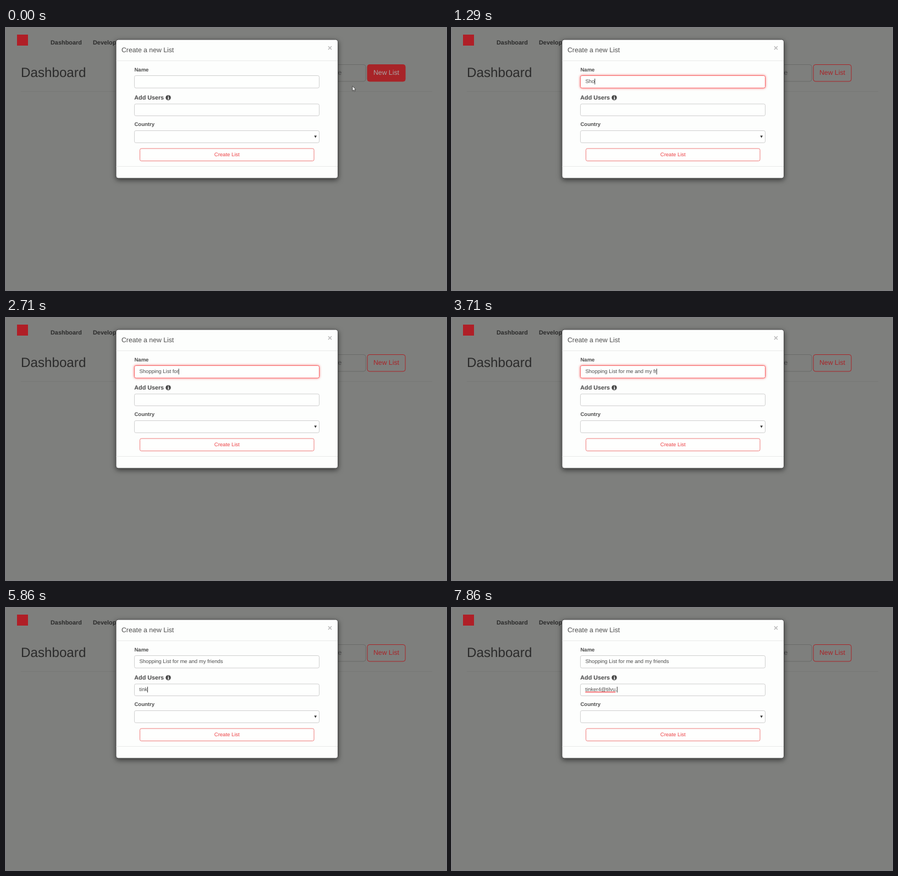
Write an HTML page that moves like this. It is 800 by 476 pixels and loops after 8000 ms.

```html
<!DOCTYPE html>
<html lang="en">
<head>
<meta charset="utf-8">
<title>Create a new List</title>
<style>
  html, body { margin: 0; width: 100%; height: 100%; overflow: hidden; background: #7e7f7d; }
  svg { display: block; font: 9.5px "Liberation Sans", Arial, sans-serif; text-rendering: geometricPrecision; }
  text { fill: #4d4d4d; white-space: pre; }
  .bold { font-weight: bold; }
  .large { font-size: 12.24px; }
  .dim { fill: #2b2b2b; }
  .rule { stroke: #e9eae9; }
  .box { fill: #fefffe; stroke: #cfcfcf; }
  .modal { fill: #fdfefd; stroke: #4a4a4a; filter: drop-shadow(0 3px 5px rgba(0, 0, 0, .55)); }
  .caret { stroke: #333; }
</style>
</head>
<body>
<svg width="800" height="476" viewBox="0 0 800 476">
  <rect x="20" y="12" width="20" height="20" fill="#b01f27"/>
  <g class="bold" font-size="10.9">
    <text class="dim" x="81" y="29.7">Dashboard</text>
    <text class="dim" x="158" y="29.7">Developers</text>
  </g>
  <text class="dim" x="27" y="89" font-size="24.2">Dashboard</text>
  <path d="M27 115.5H775" stroke="#767775"/>
  <rect x="420.5" y="66.5" width="233.5" height="30.5" rx="4" fill="none" stroke="#696a69"/>
  <text class="large" x="603.5" y="85.3">e</text>
  <rect id="newBox" x="657" y="66.5" width="69" height="30.5" rx="4" stroke="#a82428"/>
  <text id="newText" class="large" x="668" y="85.2">New List</text>

  <rect class="modal" x="200" y="21" width="403.5" height="252" rx="4"/>
  <text class="large" x="210" y="43.6">Create a new List</text>
  <text class="bold" x="584.8" y="41" font-size="14.3" style="fill:#bcbcbc">×</text>
  <path class="rule" d="M200.5 59.5H603M200.5 251.5H603"/>

  <text class="bold" x="233.5" y="78.6">Name</text>
  <rect id="nameBox" class="box" x="233.5" y="86.5" width="336" height="22.5" rx="2.7"/>
  <g id="link">
    <text id="linkText" class="bold" x="233.3" y="130.2" font-size="10.75">Add Users</text>
    <circle id="info" cx="295" cy="126.6" r="4.7"/>
    <path d="M294 125.8H295.5V129.2M293.7 129.2H296.6M294.6 123.7H295.8" fill="none" stroke="#fff" stroke-width="1.3"/>
    <rect id="ring" x="233" y="120.5" width="67" height="12.5" fill="none" stroke="#68a4ee"/>
  </g>
  <rect class="box" x="233.5" y="138" width="336" height="21.5" rx="2.7"/>
  <text class="bold" x="233.5" y="178.4">Country</text>
  <rect class="box" x="233.5" y="186.5" width="336" height="22" rx="2.7"/>
  <path d="M560.3 195.5H565L562.65 199.8Z" fill="#333"/>
  <rect class="box" x="243.5" y="219" width="316.5" height="22.5" rx="2.7" style="stroke:#ef7b7b"/>
  <text x="378.8" y="233.4" style="fill:#ed4347">Create List</text>

  <text id="name" x="242.5" y="100.3"></text>
  <text id="user" x="242.3" y="151"></text>
  <path id="squiggle" stroke="#ee2f35" stroke-width="1.1"/>
  <path id="caret" class="caret"/>
  <path id="pointer" d="M630 105.5V114.3L632 112.5L633.4 115.6L634.7 115L633.3 112H636Z" fill="#fff" stroke="#222" stroke-width=".7"/>
</svg>
<script>
const LOOP = 8000;
const NAME = "Shopping List for me and my friends";
const USER = "tinker4@tilvu.";
// [ms, characters typed]
const NAME_KEYS = [[860, 0], [1290, 3], [2710, 17], [4000, 35]];
const USER_TIMES = [5290, 5430, 5640, 5860, 6000, 6140, 6430, 6860, 7000, 7290, 7430, 7570, 7715, 7860];

const $ = id => document.getElementById(id);
const clamp = v => Math.max(0, Math.min(1, v));
const show = (id, on) => $(id).style.display = on ? "" : "none";
const mix = (a, b, k) => `rgb(${a.map((v, i) => Math.round(v + (b[i] - v) * k))})`;

function typed(t) {
  let count = 0;
  for (let i = 1; i < NAME_KEYS.length; i++) {
    const [t0, n0] = NAME_KEYS[i - 1], [t1, n1] = NAME_KEYS[i];
    if (t >= t0) count = n0 + (n1 - n0) * clamp((t - t0) / (t1 - t0));
  }
  return Math.floor(count + 1e-6);
}

function caretOn(t) {
  if (t < 860) return t >= 280 && t < 780;
  if (t < 4430) return t < 4500;
  return t >= 4850;
}

function draw(t) {
  const hover = 1 - clamp((t - 140) / 200);
  $("newBox").style.fill = `rgba(168,36,40,${hover})`;
  $("newText").style.fill = mix([168, 36, 40], [170, 165, 164], hover);
  show("pointer", t < 280);

  const focus = clamp((t - 280) / 300) * (1 - clamp((t - 4430) / 130));
  $("nameBox").style.stroke = mix([207, 207, 207], [248, 104, 106], focus);
  $("nameBox").style.filter = focus ? `drop-shadow(0 0 2px rgba(245,70,74,${focus * .8}))` : "none";

  const linked = t >= 4430 && t < 4850;
  $("linkText").style.fill = $("info").style.fill = linked ? "#ee3b40" : "#454545";
  show("ring", linked);

  $("name").textContent = NAME.slice(0, typed(t));
  $("user").textContent = USER.slice(0, USER_TIMES.filter(k => k <= t).length);

  const inUser = t >= 4430;
  const field = $(inUser ? "user" : "name");
  const width = field.getComputedTextLength();
  const x = +field.getAttribute("x") + width + .3;
  const y = inUser ? 143 : 92;
  $("caret").setAttribute("d", `M${x} ${y}v10.5`);
  show("caret", caretOn(t));

  const dot = USER_TIMES[USER_TIMES.length - 1] <= t ? 2.6 : 0;
  $("squiggle").setAttribute("d", `M242.3 152.6h${Math.max(0, width - dot)}`);
  show("squiggle", t >= 7000);
}

const start = performance.now();
function tick() {
  draw((performance.now() - start) % LOOP);
  requestAnimationFrame(tick);
}
tick();
</script>
</body>
</html>
```
